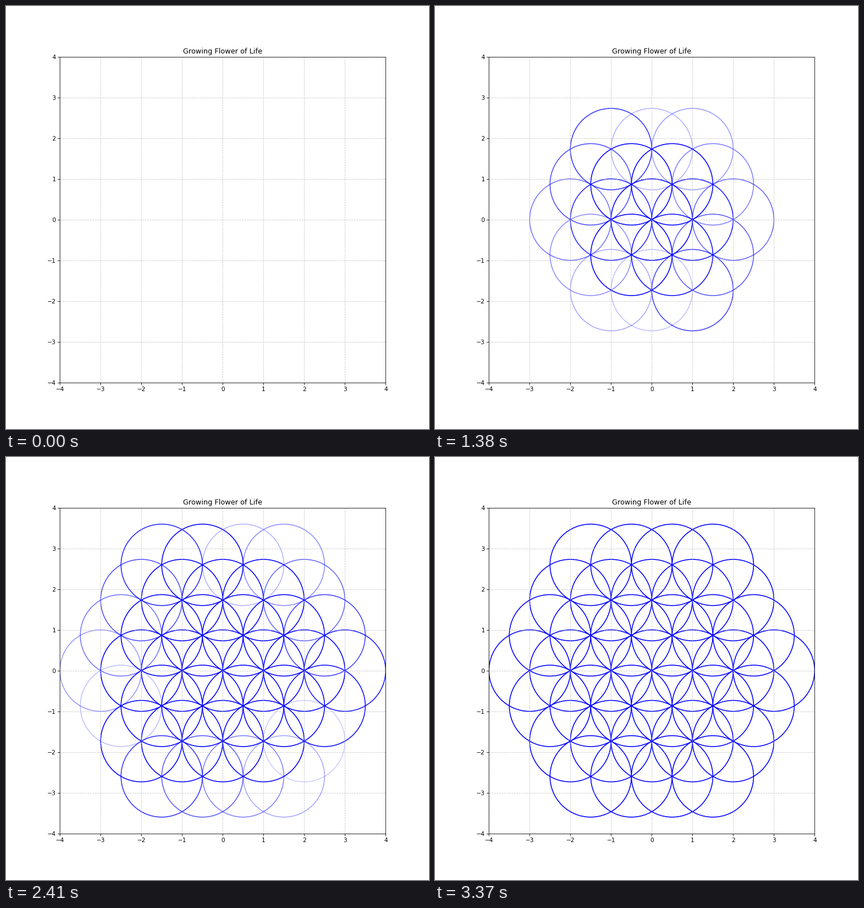
These frames come from a looping animation (748 by 748 pixels, 3630 ms). A matplotlib script:

```python
import math

import matplotlib.pyplot as plt
from matplotlib.animation import FuncAnimation
from matplotlib.patches import Circle

STAGE_PX = 748
FIG_INCHES = 10
TICK_MS = 30
TICKS = 121
TICKS_PER_STEP = 2
STEPS_PER_RING = 20
FADE_STEPS = 20

# Where each ring's sweep starts and after how many places it repeats.
SWEEPS = {1: (1, 3), 2: (4, 6), 3: (5, 6)}


def corner(side):
    angle = side * math.pi / 3
    return math.cos(angle), math.sin(angle)


def place(ring, k):
    """Centre number k, counted anticlockwise along a hexagonal ring."""
    side, along = divmod(k, ring)
    (x0, y0), (x1, y1) = corner(side), corner(side + 1)
    return x0 * (ring - along) + x1 * along, y0 * (ring - along) + y1 * along


def ring_centers(ring):
    """Centres in order of appearance; several arms sweep the ring together."""
    start, period = SWEEPS[ring]
    order = sorted(range(6 * ring), key=lambda k: (k - start) % period)
    return [place(ring, k) for k in order]


fig, ax = plt.subplots(figsize=(FIG_INCHES, FIG_INCHES),
                       dpi=STAGE_PX / FIG_INCHES)
ax.set_xlim(-4, 4)
ax.set_ylim(-4, 4)
ax.set_aspect("equal")
ax.grid(True, linestyle="--", alpha=0.7)
ax.set_title("Growing Flower of Life")

circles = []


def add_circle(center, opens_at):
    circle = Circle(center, 1, fill=False, edgecolor="blue", linewidth=1.5,
                    visible=False)
    ax.add_patch(circle)
    circles.append((circle, opens_at))


add_circle((0, 0), 2)
for ring in SWEEPS:
    for center in ring_centers(ring):
        add_circle(center, (ring - 1) * STEPS_PER_RING)


def update(tick):
    """Each circle fades in one step after the last, once its ring is open."""
    step = tick // TICKS_PER_STEP
    for index, (circle, opens_at) in enumerate(circles):
        alpha = min(max((step - index) / FADE_STEPS, 0), 1)
        circle.set_alpha(alpha)
        circle.set_visible(alpha > 0 and step >= opens_at)
    return [circle for circle, _ in circles]


animation = FuncAnimation(fig, update, frames=TICKS, interval=TICK_MS,
                          repeat=True, repeat_delay=0)
plt.show()
```
